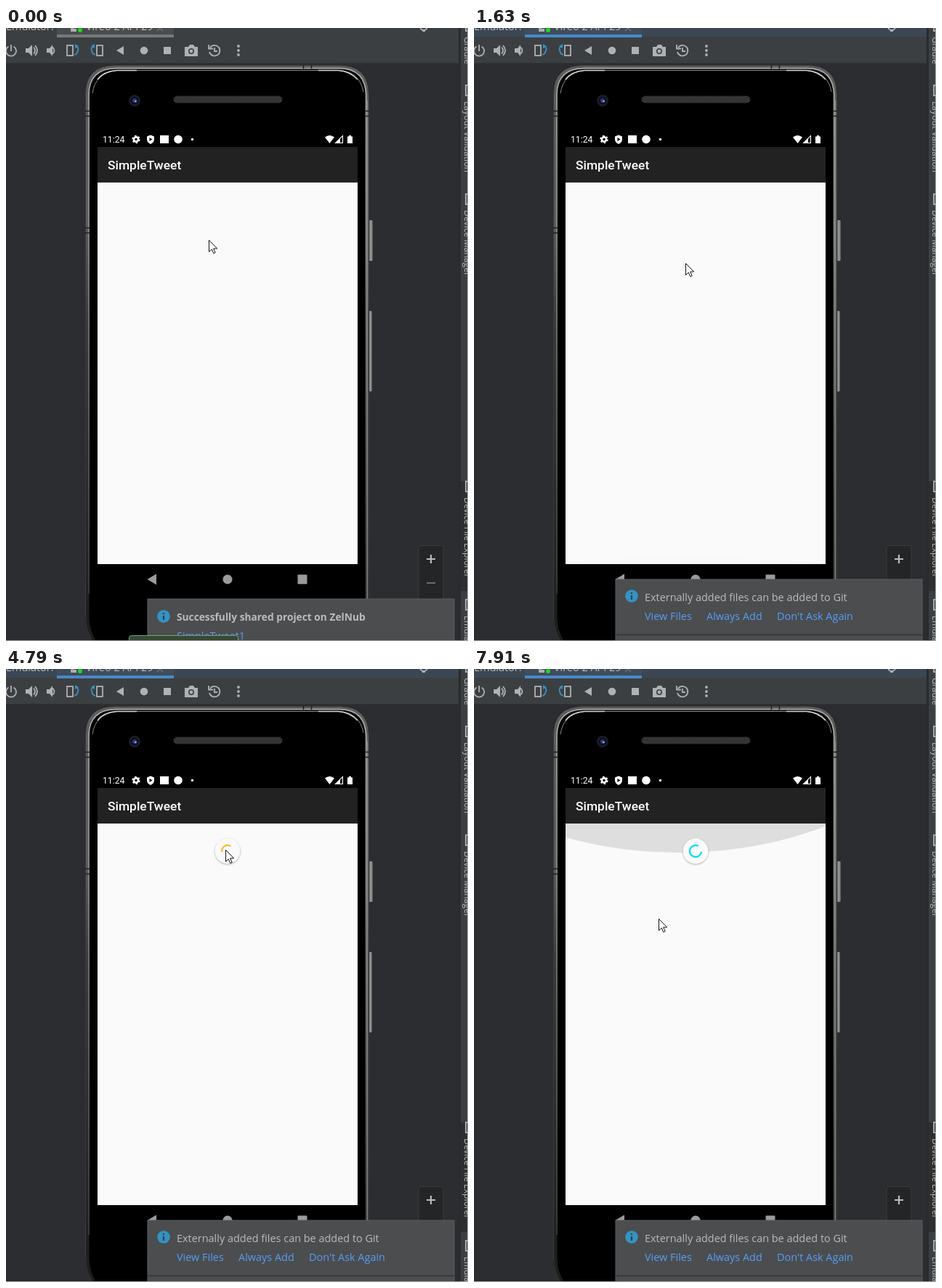
These frames come from a looping animation (636x845 px, 8 s). An HTML page:

```html
<!DOCTYPE html>
<html lang="en">
<head>
<meta charset="utf-8">
<title>Pull to refresh</title>
<style>
html, body { margin: 0; width: 100%; height: 100%; overflow: hidden; background: #2b2d30; }
svg { display: block; width: 636px; height: 845px; }
.ui { font: 14.45px "Open Sans", "Noto Sans", sans-serif; fill: #bbb; }
.side { font-size: 12.2px; }
.bold { font-weight: 700; font-size: 13.75px; }
.link { fill: #589df6; }
.app { font-family: Roboto, sans-serif; fill: #fff; }
.line { fill: none; stroke: #afb1b3; stroke-width: 1.8; }
.rim { fill: none; }
</style>
</head>
<body>
<svg viewBox="0 0 636 845">
  <defs>
    <linearGradient id="band" x1="0" y1="50" x2="0" y2="845" gradientUnits="userSpaceOnUse">
      <stop offset="0" stop-color="#5c5c5c"/><stop offset=".28" stop-color="#5c5c5c"/>
      <stop offset=".45" stop-color="#3a3a3a"/><stop offset="1" stop-color="#1c1c1c"/>
    </linearGradient>
    <linearGradient id="shine" x1="0" y1="50" x2="0" y2="845" gradientUnits="userSpaceOnUse">
      <stop offset="0" stop-color="#b0b0b0"/><stop offset=".3" stop-color="#8e8e8e"/>
      <stop offset=".6" stop-color="#6a6a6a"/><stop offset="1" stop-color="#333"/>
    </linearGradient>
    <linearGradient id="key"><stop offset="0" stop-color="#4a4a4a"/><stop offset=".55" stop-color="#a0a0a0"/><stop offset="1" stop-color="#555"/></linearGradient>
    <pattern id="mesh" width="4" height="4" patternUnits="userSpaceOnUse">
      <rect width="4" height="4" fill="#0c0c0c"/><path d="M0 0L2 2L0 4M2 0L4 2L2 4" fill="none" stroke="#666" stroke-width=".9"/>
    </pattern>
    <filter id="soft" x="-30%" y="-30%" width="160%" height="160%"><feGaussianBlur stdDeviation="1.3"/></filter>
    <clipPath id="page"><rect x="126" y="213" width="358" height="526"/></clipPath>
    <clipPath id="pane"><rect y="49" width="623" height="796"/></clipPath>
  </defs>

  <rect width="636" height="845" fill="#2b2d30"/>

  <!-- tab strip and toolbar -->
  <rect width="636" height="48" fill="#3c3f41"/>
  <rect id="strip" width="623" height="12"/>
  <rect id="tab" x="70" width="161" height="10"/>
  <rect id="mark" x="70" y="9" width="161" height="4"/>
  <g class="ui">
    <text x="0" y="2.5">Emulator:</text>
    <text x="110" y="2.5">Vireo 2 API 29</text>
  </g>
  <path d="M90 0V4H97M92 0V2H97" class="line"/>
  <circle cx="102" cy="3" r="3" fill="#1dd81d"/>
  <path d="M208 4L212 0L216 4" class="line" style="stroke:#777;stroke-width:1.2"/>
  <circle cx="575" cy="-2" r="5" class="line"/><path d="M573 3h4v2h-4z" fill="#afb1b3"/>
  <rect y="48" width="623" height="1" fill="#303335"/>
  <g class="line">
    <path d="M3.5 25.5A7 7 0 1 0 10.5 25.5M7 23V32"/>
    <path d="M38 26.5Q42 31 38 35.5M40 24Q46 31 40 38"/>
    <path d="M64 26.5Q69 31 64 35.5"/>
    <rect x="84" y="24" width="8" height="14"/>
    <rect x="125" y="24" width="8" height="14"/>
    <path d="M95 25Q101 26 99 31Q98 36 94 37M122 25Q116 26 118 31Q119 36 123 37" stroke="#3592c4"/>
    <path d="M281 27A7.3 7.3 0 1 1 280 33M279 23V28.5H285M287 27V32H291"/>
  </g>
  <g fill="#afb1b3">
    <path d="M27 28h4l5-5v16l-5-5h-4zM56 28h4l4-5v16l-4-5h-4zM152 31l10-6v12zM217 26h10v10h-10z"/>
    <path d="M95 22l5 3-5 3zM122 22l-5 3 5 3z" fill="#3592c4"/>
    <circle cx="190" cy="31" r="5.3"/>
    <path d="M246 26h5l2-3h5l2 3h4v13h-18z"/><circle cx="255" cy="32" r="4" fill="#3c3f41"/><circle cx="255" cy="32" r="2.4"/>
    <circle cx="320" cy="25" r="1.9"/><circle cx="320" cy="31" r="1.9"/><circle cx="320" cy="37" r="1.9"/>
  </g>

  <!-- phone -->
  <g clip-path="url(#pane)">
    <rect x="499" y="265" width="6" height="56" rx="1.5" fill="url(#key)"/>
    <rect x="499" y="390" width="5" height="111" rx="1.5" fill="url(#key)"/>
    <path d="M109 90Q109 51 150 51H460Q500 51 500 92V812Q500 832 488 850H122Q109 832 109 812Z" fill="#000"/>
    <path class="rim" d="M124 850Q112 832 112 812V91Q112 54 151 54H459Q497 54 497 93V812Q497 832 486 850" stroke="url(#band)" stroke-width="5"/>
    <path class="rim" d="M122 850Q109.500 832 109.500 812V90Q109.500 51.500 150 51.500H460Q499.500 51.500 499.500 92V812Q499.500 832 488 850" stroke="#3a3a3a"/>
    <path class="rim" d="M114 780V91Q115 56 151 55.500H459Q495 56 496 93V800" stroke="url(#shine)" stroke-width="1.5"/>
    <path class="rim" d="M497.500 100V800" stroke="#858585" stroke-width="1.5"/>
    <path class="rim" d="M119 90Q123 62 152 58.500H458Q487 60 492 88" stroke="#8a8a8a"/>
    <path class="rim" d="M126 71Q134 60 152 58.500H180M430 58.500H458Q474 60 484 71" stroke="#d8d8d8" stroke-width="1.5"/>
    <path d="M109 114.500h7M109 121.500h7M109 275.500h7M109 282.500h7M495 114.500h5M495 121.500h5M409.500 51v5M420.500 51v5" stroke="#1e1e1e" stroke-width="1.5"/>
    <rect x="231" y="94" width="149" height="9" rx="4.5" fill="url(#mesh)" stroke="#2c2c2c"/>
    <circle cx="177" cy="100" r="8" fill="#1b1c20"/><circle cx="177" cy="100" r="5" fill="#0b0d1c"/>
    <circle cx="177" cy="100" r="3" fill="#283a86"/><circle cx="178.5" cy="101" r="1.3" fill="#a4b4ee"/>
  </g>

  <!-- status bar -->
  <text class="app" x="133" y="158" font-size="12.2">11:24</text>
  <g fill="#fff">
    <circle cx="179" cy="153.5" r="3.1" fill="none" stroke="#fff" stroke-width="2.6"/>
    <circle cx="179" cy="153.5" r="4.9" fill="none" stroke="#fff" stroke-width="1.6" stroke-dasharray="2.6 2.53"/>
    <path d="M199 147.5l5 2v4q0 4-5 6.5q-5-2.5-5-6.5v-4z"/><path d="M197.5 151l4 2.5-4 2.5z" fill="#000"/>
    <rect x="212" y="148" width="12" height="11"/>
    <circle cx="237" cy="153.5" r="5.8"/>
    <circle cx="256.5" cy="153.5" r="1.7"/>
    <path d="M439 150.5Q445.5 145.5 452 150.5L445.5 159Z"/>
    <path d="M463.5 148.5V158.5H453.5Z" fill="none" stroke="#fff" stroke-width="1.1"/><path d="M460 152v6.5h-6.5z"/>
    <path d="M470 149.5h2v-1.5h3v1.5h2V159h-7z"/>
  </g>

  <!-- app -->
  <rect x="126" y="164" width="358" height="49" fill="#222"/>
  <text class="app" x="140" y="195" font-size="17.4" font-weight="500">SimpleTweet</text>
  <rect x="126" y="213" width="358" height="526" fill="#fafafa"/>
  <g clip-path="url(#page)">
    <ellipse id="glowTop" rx="358"/>
    <ellipse id="glowEnd" rx="358"/>
    <g id="disc">
      <circle cy="1" r="17.8" opacity=".24" filter="url(#soft)"/>
      <circle r="17.4" fill="#fafafa"/>
      <path id="ring" fill="none" stroke-width="2.3" stroke-linecap="square"/>
      <path id="tip" d="M-4 0H4L0 4.3Z"/>
    </g>
  </g>
  <g fill="#9b9b9b">
    <path d="M194.5 760l12.500-7.500v15z"/><circle cx="305" cy="760" r="6.500"/><rect x="401.500" y="753.500" width="13" height="13" rx="1"/>
  </g>

  <!-- zoom buttons -->
  <rect x="568" y="713.5" width="34" height="100" rx="3" fill="#242526" stroke="#3a3c3e"/>
  <path d="M579 732h12M585 726v12" stroke="#bbb" stroke-width="2.2"/>
  <path d="M579 765h12" stroke="#6e6e6e" stroke-width="2"/>

  <!-- notifications -->
  <g id="noteA" class="ui">
    <rect x="195" y="787" width="422" height="70" fill="#4b4d4f" stroke="#5c5f61"/>
    <text class="bold" x="235" y="817">Successfully shared project on ZelNub</text>
    <text class="link" x="235" y="843" text-decoration="underline">SimpleTweet1</text>
    <rect x="169.5" y="837.5" width="150" height="20" rx="3" fill="#354a35" stroke="#7f9a74"/>
  </g>
  <g id="noteB" class="ui">
    <rect x="195" y="760" width="422" height="95" fill="#4b4d4f" stroke="#5c5f61"/>
    <path d="M195 836.5H617" stroke="#333638" stroke-width="1.5"/>
    <text x="235" y="790">Externally added files can be added to Git</text>
    <g class="link"><text x="235" y="816">View Files</text><text x="320" y="816">Always Add</text><text x="417" y="816">Don't Ask Again</text></g>
  </g>
  <g id="info">
    <circle r="8.8" fill="#3592c4"/>
    <path d="M0-1V5M0-5V-2.7" stroke="#33404a" stroke-width="2.2"/>
  </g>

  <!-- right tool bar -->
  <rect x="623" width="13" height="845" fill="#3c3f41"/>
  <rect x="626" y="625" width="10" height="151" fill="#2d2f30"/>
  <rect x="623" width="3" height="845" fill="#292b2d"/>
  <g id="side" class="ui side"></g>
  <path d="M635.5 0V844.5H0" fill="none" stroke="#a0a0a0"/>

  <path id="cursor" d="M.5 .5V16.5L4.3 13L6.8 18.7L9.2 17.6L6.7 12H11.700Z" fill="#fff" stroke="#111"/>
</svg>
<script>
const LOOP = 8000;
const $ = id => document.getElementById(id);
const set = (id, attrs) => { for (const k in attrs) $(id).setAttribute(k, attrs[k]); };
const clamp = (v, a = 0, b = 1) => Math.min(b, Math.max(a, v));

// Linear interpolation through rows of [time, ...values].
function track(rows, t) {
  if (t <= rows[0][0]) return rows[0].slice(1);
  for (let i = 1; i < rows.length; i++) {
    const a = rows[i - 1], b = rows[i];
    if (t < b[0]) {
      const k = (t - a[0]) / (b[0] - a[0]);
      return a.slice(1).map((v, j) => v + (b[j + 1] - v) * k);
    }
  }
  return rows[rows.length - 1].slice(1);
}

const holds = [[0, 0], [1, 120], [7, 930], [8, 1080], [9, 1210], [12, 1630], [13, 1750], [16, 2170],
  [17, 2290], [21, 2800], [25, 3280], [26, 3410], [33, 4340], [34, 4490], [36, 4790], [41, 5480],
  [42, 5630], [44, 5900], [49, 6590], [50, 6710], [57, 7670], [59, 7910]];
const ticks = Array.from({ length: 60 }, (_, i) => Math.round(track(holds, i)[0]));

const pointer = [[0, 279, 292], [120, 279, 305], [420, 283, 455], [600, 286, 478], [780, 284, 415],
  [930, 282, 344], [1080, 282, 310], [1350, 286, 312], [1630, 291, 324], [1880, 292, 318],
  [2290, 297, 575], [2400, 300, 592], [2540, 306, 520], [2800, 324, 285], [3280, 328, 274],
  [3700, 334, 252], [4340, 306, 240], [4490, 299, 242], [4790, 302, 249], [5080, 338, 272],
  [5480, 280, 250], [5900, 229, 219], [6320, 394, 262], [6590, 350, 272], [6900, 300, 268],
  [7150, 285, 290], [7670, 262, 449], [7790, 258, 420], [7910, 254, 344]];
// [time, depth, opacity]
const endGlow = [[600, 0, 0], [930, 23, .074], [1080, 24, .075], [1650, 8, .004], [1750, 0, 0]];
const topGlow = [[7150, 0, 0], [7670, 43, .13], [7910, 40, .115]];

const COLORS = [[0, 221, 255], [153, 204, 0], [255, 187, 51], [255, 68, 68]];
const CYCLE = 1295, GRAB = 1880, RELEASE = 2448, SPIN = 2648, REST = 251, DIST = 56;

// cubic-bezier(.4, 0, .2, 1)
function ease(x) {
  let lo = 0, hi = 1, u;
  for (let i = 0; i < 20; i++) {
    u = (lo + hi) / 2;
    const px = 1.2 * (1 - u) ** 2 * u + .6 * (1 - u) * u * u + u ** 3;
    if (px < x) lo = u; else hi = u;
  }
  return 3 * (1 - u) * u * u + u ** 3;
}

function pull(t) {
  const y = track(pointer, Math.min(t, 2400))[1];
  const over = Math.max(0, y - 318) / 2, part = clamp(over / DIST);
  const s = clamp((over - DIST) / DIST, 0, 2) / 4, tension = (s - s * s) * 2;
  const adj = Math.max(part - .4, 0) * 5 / 3;
  return {
    y: REST - DIST + DIST * part + DIST * tension * 2,
    start: 0, end: Math.min(.8, adj * .8), turn: (-.25 + .4 * adj + tension * 2) / 2,
    group: 0, color: 0, mix: 0, alpha: part < 1 ? .3 : 1, arrow: Math.min(1, adj)
  };
}

function spinner(t) {
  const p = pull(Math.min(t, RELEASE));
  if (t < RELEASE) return p;
  const back = clamp((t - RELEASE) / 200);
  p.y = REST + (p.y - REST) * (1 - back) ** 2;
  if (t < SPIN) return p;
  p.arrow = 0;
  let k = (t - SPIN) / (CYCLE / 2);
  if (k < 1) {
    p.start = (p.end - .01) * k;
    p.turn += (1 - p.turn) * k;
    p.mix = clamp((k - .75) * 4);
    return p;
  }
  k = (t - SPIN) / CYCLE - .5;
  const n = Math.floor(k), f = k - n, base = .79 + .78 * n;
  p.start = base;
  if (f < .5) p.end = base + .79 * ease(f * 2) + .01;
  else {
    p.end = base + .79;
    p.start = p.end - .79 * (1 - ease(f * 2 - 1)) - .01;
  }
  p.turn = 1 + .21 * k;
  p.group = 216 * k;
  p.color = n + 1;
  p.mix = clamp((f - .75) * 4);
  return p;
}

function drawSpinner(t) {
  const on = t >= GRAB;
  set("disc", { visibility: on ? "visible" : "hidden" });
  if (!on) return;
  const p = spinner(t), r = 8;
  const a = ((p.start + p.turn) * 360 + p.group) % 360, sweep = (p.end - p.start) * 360;
  const at = deg => {
    const w = deg * Math.PI / 180;
    return `${(r * Math.cos(w)).toFixed(2)} ${(r * Math.sin(w)).toFixed(2)}`;
  };
  const from = COLORS[p.color % 4], to = COLORS[(p.color + 1) % 4];
  const color = `rgb(${from.map((v, i) => Math.round(v + (to[i] - v) * p.mix))})`;
  set("disc", { transform: `translate(305 ${p.y.toFixed(2)})` });
  set("ring", {
    d: `M${at(a)}A${r} ${r} 0 ${sweep > 180 ? 1 : 0} 1 ${at(a + sweep)}`,
    stroke: color, opacity: p.alpha
  });
  set("tip", {
    transform: `rotate(${a + sweep}) translate(${r} 0) scale(${p.arrow})`, fill: color, opacity: p.alpha
  });
}

function drawGlow(id, rows, t, x, edge, dir) {
  const [depth, alpha] = track(rows, t), ry = 358 * depth * .0146;
  set(id, { cx: x, cy: edge + dir * (depth - ry), ry, opacity: alpha });
}

function draw(time) {
  const t = ticks.filter(v => v <= time).pop();
  const focus = t >= 600, added = t >= 1480;
  set("strip", { fill: focus ? "#3b4754" : "#3c3f41" });
  set("tab", { fill: focus ? "#3f4d5c" : "#4a4d4f" });
  set("mark", { fill: focus ? "#4a88c7" : "#74797d" });
  set("noteA", { visibility: added ? "hidden" : "visible" });
  set("noteB", { visibility: added ? "visible" : "hidden" });
  set("info", { transform: `translate(217 ${added ? 783 : 811})` });
  drawGlow("glowTop", topGlow, t, 282, 213, 1);
  drawGlow("glowEnd", endGlow, t, 293, 739, -1);
  drawSpinner(t);
  const [x, y] = track(pointer, t);
  set("cursor", { transform: `translate(${Math.round(x)} ${Math.round(y)})` });
}

$("side").innerHTML = [["Gradle", 12], ["Layout Validation", 101], ["Device Manager", 251],
  ["Device File Explorer", 647], ["Emulator", 810]].map(([s, y]) =>
  `<text transform="translate(631 ${y}) rotate(90)">${s}</text>` +
  `<path class="line" d="M637 ${y - 22}H633V${y - 8}H637"/>`).join("");

const begin = performance.now();
function loop() {
  draw((performance.now() - begin) % LOOP);
  requestAnimationFrame(loop);
}
loop();
</script>
</body>
</html>
```
